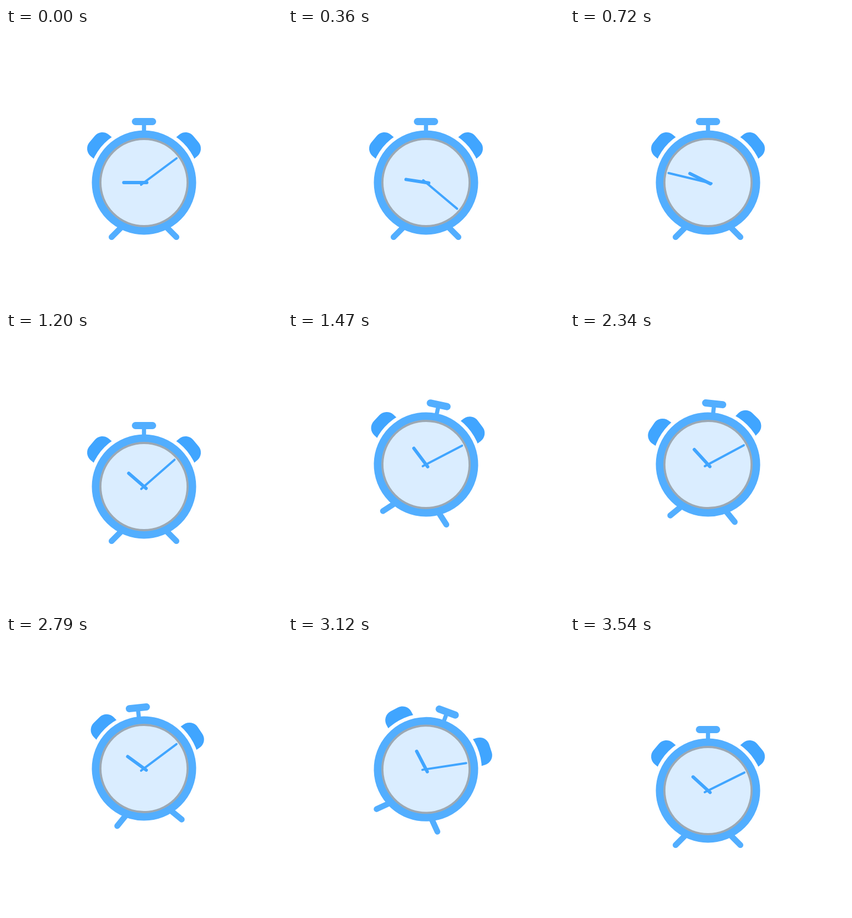
These frames come from a looping animation (500 by 500 pixels, 3.63 s). An HTML page:

```html
<!DOCTYPE html>
<html lang="en">
<head>
<meta charset="utf-8">
<title>Alarm clock</title>
<style>
  html, body { margin: 0; width: 100%; height: 100%; overflow: hidden; background: #fff; }
  svg { display: block; width: 100%; height: 100%; }
  .body { fill: none; stroke: #52aeff; stroke-linecap: round; }
  .bell { fill: #40a5ff; }
  .hand { stroke: #40a5ff; stroke-linecap: round; }
</style>
</head>
<body>
<svg viewBox="0 0 500 500">
  <!-- every part is drawn around the centre of the dial -->
  <g id="clock">
    <g id="bells">
      <rect class="bell" x="-25.5" y="-122.7" width="51" height="54" rx="18" transform="rotate(-50)"/>
      <rect class="bell" x="-25.5" y="-122.7" width="51" height="54" rx="18" transform="rotate(50)"/>
      <circle r="101" fill="#fff"/>
    </g>
    <g id="frame">
      <g class="body">
        <path d="M-15.5-110.5H15.5" stroke-width="13"/>
        <path d="M0-108V-90" stroke-width="7.5"/>
        <path d="M-38 78L-58.7 98.8M38 78L58.7 98.8" stroke-width="10.6"/>
        <circle r="87" stroke-width="15"/>
      </g>
      <circle r="79" fill="#daedff" stroke="#9ca8b3" stroke-width="3.8"/>
      <path id="hour" class="hand" d="M0 5V-36.6" stroke-width="6"/>
      <path id="minute" class="hand" d="M0 6.6V-73.6" stroke-width="4"/>
    </g>
  </g>
</svg>
<script>
  const STEP = 30, LOOP = 3630, LAST = 118;
  const RING = 40, BEAT = 3, WIDE = 22, SWING = 12;
  const part = id => document.getElementById(id);
  const [clock, bells, frame, hour, minute] =
    ['clock', 'bells', 'frame', 'hour', 'minute'].map(part);

  const ramp = (n, a, b) => Math.min(1, Math.max(0, (n - a) / (b - a)));
  const ease = (n, a, b) => { const t = ramp(n, a, b); return t * t * (3 - 2 * t); };

  // Rest, one wide swing, steady ringing, one wide swing back to rest
  const peak = k =>
    k < 2 || k > 22 ? 0 : (k % 2 ? 1 : -1) * (k === 2 || k === 21 ? WIDE : SWING);

  function swing(n) {
    const beat = (n - RING) / BEAT;
    if (beat < 2) return peak(2) * ease(beat, 0, 2);
    if (beat > 21) return peak(21) * (1 - ease(beat, 21, 23));
    const k = Math.floor(beat);
    return peak(k) + (peak(k + 1) - peak(k)) * ease(beat, k, k + 1);
  }

  const turn = (el, deg) => el.setAttribute('transform', `rotate(${deg})`);

  function draw(now) {
    const n = Math.min(LAST, Math.floor(now % LOOP / STEP));
    const lift = 40 * (ease(n, RING, 49) - ease(n, 103, 112));
    const run = ease(n, 0, RING), drift = ramp(n, RING, LAST);

    clock.setAttribute('transform', `translate(250 ${280 - lift})`);
    turn(frame, swing(n));
    turn(bells, swing(n - 1));
    turn(hour, 270 + 41 * run + 1.4 * drift);
    turn(minute, 53.3 + 355.4 * run + 15 * drift);
  }

  const start = performance.now();
  function tick() {
    draw(performance.now() - start);
    requestAnimationFrame(tick);
  }
  tick();
</script>
</body>
</html>
```
